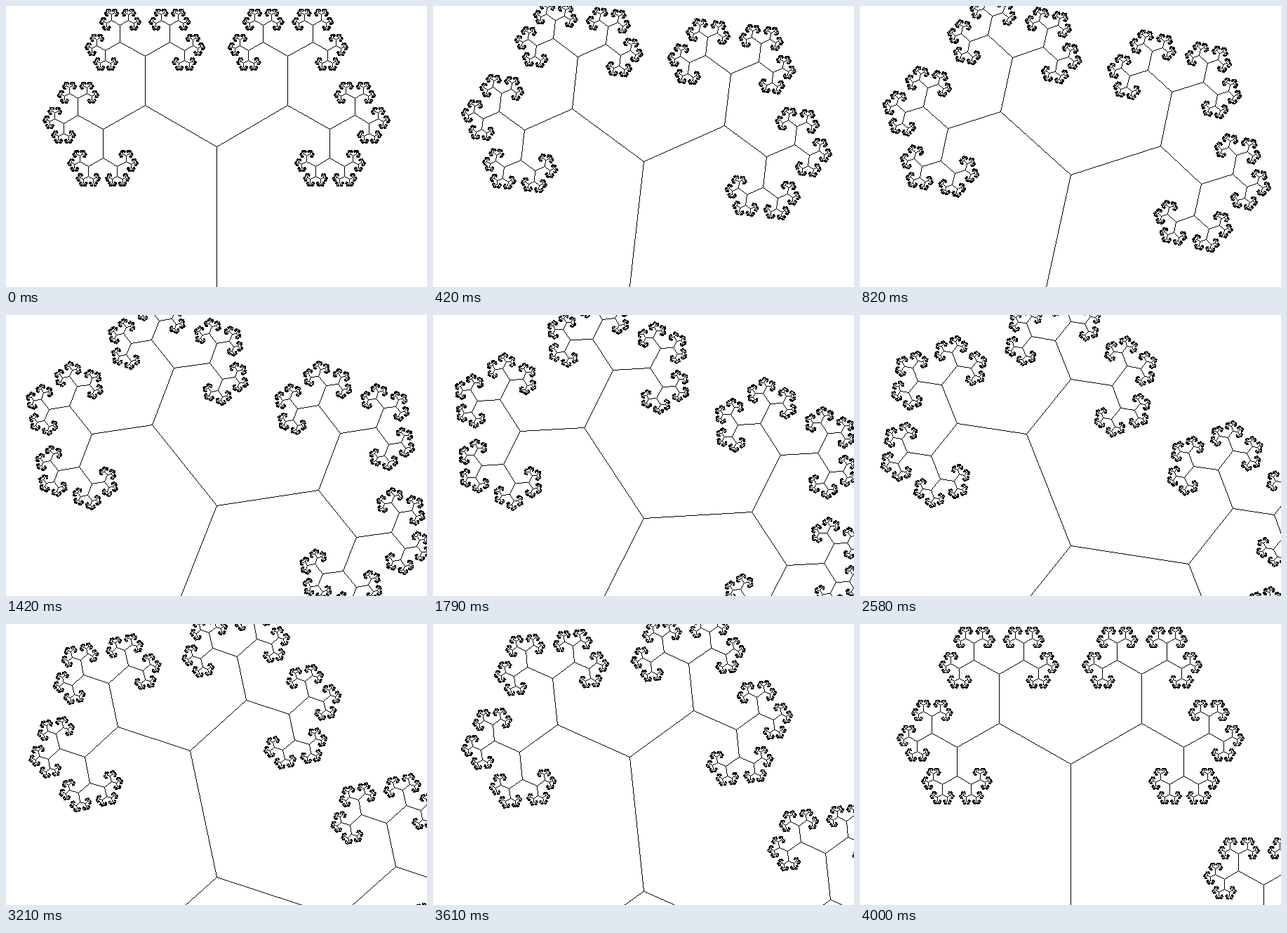
An HTML page with a canvas for the animation above (4.03 s loop, 600x400 px).

```html
<!DOCTYPE html>
<html lang="en">
<head>
<meta charset="utf-8">
<title>Endless tree</title>
<style>
  html, body { margin: 0; width: 600px; height: 400px; overflow: hidden; background: #fff; }
  canvas { display: block; }
</style>
</head>
<body>
<canvas id="stage" width="600" height="400"></canvas>
<script>
const W = 600, H = 400;
const LOOP = 4030, STEPS = 133;
const RATIO = 0.5885, GROWTH = 0.7, TURN = Math.PI / 3, TRUNK = 200, DEPTH = 14;
const BLACK = 0xff000000, WHITE = 0xffffffff;

const ctx = document.getElementById('stage').getContext('2d');
const image = ctx.createImageData(W, H);
const pixels = new Uint32Array(image.data.buffer);

// One-pixel line without antialiasing
function line(x0, y0, x1, y1) {
  x0 = Math.floor(x0); y0 = Math.floor(y0);
  x1 = Math.floor(x1); y1 = Math.floor(y1);
  const dx = Math.abs(x1 - x0), dy = -Math.abs(y1 - y0);
  const sx = x0 < x1 ? 1 : -1, sy = y0 < y1 ? 1 : -1;
  let err = dx + dy;
  for (;;) {
    if (x0 >= 0 && x0 < W && y0 >= 0 && y0 < H) pixels[y0 * W + x0] = BLACK;
    if (x0 === x1 && y0 === y1) return;
    const e2 = 2 * err;
    if (e2 >= dy) { err += dy; x0 += sx; }
    if (e2 <= dx) { err += dx; y0 += sy; }
  }
}

// Angles are measured clockwise from straight up
function branch(x, y, length, angle, depth) {
  const endX = x + length * Math.sin(angle);
  const endY = y - length * Math.cos(angle);
  line(x, y, endX, endY);
  if (depth < DEPTH) fork(endX, endY, length * RATIO, angle, depth + 1);
}

function fork(x, y, length, angle, depth) {
  branch(x, y, length, angle - TURN, depth);
  branch(x, y, length, angle + TURN, depth);
}

// Over one loop the left branch grows and turns into the trunk
function draw(progress) {
  const angle = TURN * progress;
  const length = TRUNK * (1 + GROWTH * progress);
  const x = W / 2, y = 200 + 200 * progress;
  pixels.fill(WHITE);
  line(x, y, x - length * Math.sin(angle), y + length * Math.cos(angle));
  fork(x, y, length * RATIO, angle, 1);
  ctx.putImageData(image, 0, 0);
}

const start = performance.now();
let shown = -1;

function tick() {
  const time = (performance.now() - start) % LOOP;
  const step = Math.min(STEPS - 1, Math.floor((time + 5) * STEPS / LOOP));
  if (step !== shown) {
    shown = step;
    draw(step / (STEPS - 1));
  }
  requestAnimationFrame(tick);
}
tick();
</script>
</body>
</html>
```
